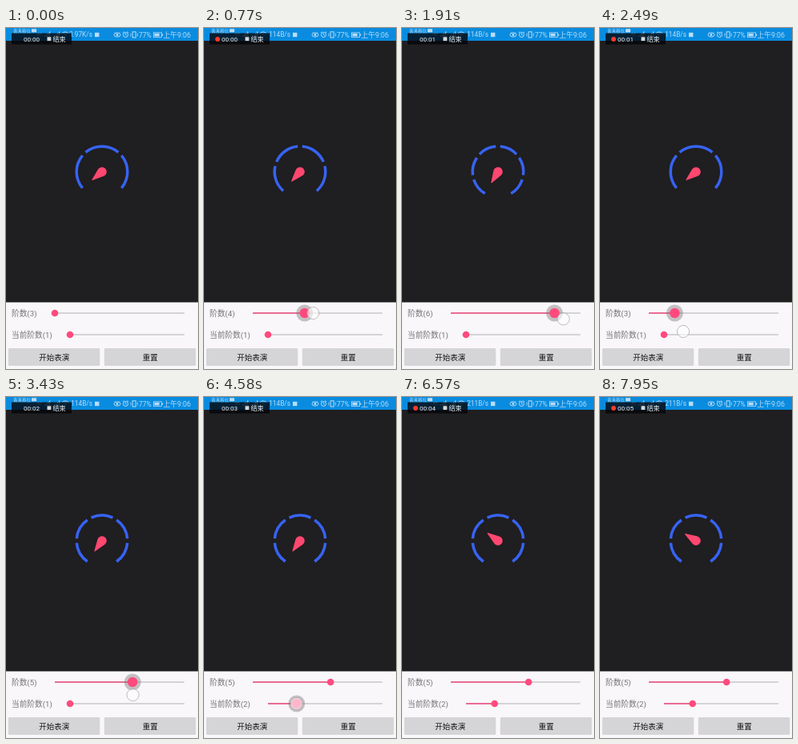
Write an HTML page with a canvas that moves like this. It is 240 px wide and 427 px high and loops after 7.99 s.

```html
<!DOCTYPE html>
<html lang="zh">
<head>
<meta charset="utf-8">
<style>
html, body { margin: 0; width: 100%; height: 100%; overflow: hidden; background: #1f1e20; }
canvas { display: block; width: 100vw; height: 100vh; }
</style>
</head>
<body>
<canvas id="stage"></canvas>
<script>
const W = 240, H = 427, LOOP = 7990;
const PINK = '#ff4a7d', BLUE = '#3763f2', PALE = '#b9dcf6';
const SANS = 'Roboto, "Noto Sans CJK SC", "Noto Sans CJK", sans-serif';
const canvas = document.getElementById('stage');
const ctx = canvas.getContext('2d');
const rad = d => d * Math.PI / 180;
const clamp = v => Math.max(0, Math.min(1, v));
const ease = p => p * p * (3 - 2 * p);

// Finger paths: [ms, x, y]
const dragOne = [[360, 61, 357], [1160, 208, 357], [1310, 215, 357], [1560, 217, 358], [1950, 200, 365],
  [2490, 104, 380], [2680, 101, 377], [2900, 106, 375], [3300, 156, 373], [3450, 159, 373]];
const dragTwo = [[3900, 80, 384], [4120, 84, 384], [4450, 115, 384], [4650, 116, 384]];
const tap = [[5200, 62, 412], [5420, 62, 412]];

function along(path, t) {
  const last = path.length - 1;
  if (t >= path[last][0]) return path[last];
  let i = 0;
  while (i < last - 1 && t >= path[i + 1][0]) i++;
  const a = path[i], b = path[i + 1];
  const p = clamp((t - a[0]) / (b[0] - a[0]));
  return a.map((v, k) => v + (b[k] - v) * p);
}
const held = (path, t) => t >= path[0][0] && t < path[path.length - 1][0];

function rect(x, y, w, h, color) {
  ctx.fillStyle = color;
  ctx.fillRect(x, y, w, h);
}

function disc(x, y, r, color) {
  ctx.fillStyle = color;
  ctx.beginPath();
  ctx.arc(x, y, r, 0, 7);
  ctx.fill();
}

function line(color, width, ...pts) {
  ctx.strokeStyle = color;
  ctx.lineWidth = width;
  ctx.beginPath();
  pts.forEach(([x, y]) => ctx.lineTo(x, y));
  ctx.stroke();
}

function text(str, x, y, size, color, align = 'left', weight = 400) {
  ctx.font = `${weight} ${size}px ${SANS}`;
  ctx.textAlign = align;
  ctx.fillStyle = color;
  ctx.fillText(str, x, y);
}

function statusIcons() {
  for (let i = 0; i < 4; i++) {
    rect(48 + i * 2, 9 - i * 1.5, 1.3, 2 + i * 1.5, PALE);
    rect(60 + i * 2, 9 - i * 1.5, 1.3, 2 + i * 1.5, PALE);
  }
  text('4G', 38, 10, 6, PALE);
  ctx.strokeStyle = PALE;
  ctx.lineWidth = 1;
  for (const r of [3, 6]) {
    ctx.beginPath();
    ctx.arc(74, 11, r, rad(225), rad(315));
    ctx.stroke();
  }
  // eye
  ctx.beginPath();
  ctx.ellipse(139, 8.5, 4, 2.6, 0, 0, 7);
  ctx.stroke();
  disc(139, 8.5, 1.4, PALE);
  line(PALE, 0.8, [136, 5.5], [137, 6.5]);
  line(PALE, 0.8, [142, 5.5], [141, 6.5]);
  // alarm
  ctx.lineWidth = 1;
  ctx.beginPath();
  ctx.arc(149.5, 8.5, 3, 0, 7);
  ctx.stroke();
  line(PALE, 0.8, [149.5, 6.5], [149.5, 8.7], [151, 9.3]);
  line(PALE, 1, [146, 6], [147.5, 4.6]);
  line(PALE, 1, [153, 6], [151.5, 4.6]);
  // vibrate
  ctx.strokeRect(158.2, 4.8, 4, 7.2);
  line(PALE, 0.8, [156, 6.5], [156, 10.5]);
  line(PALE, 0.8, [164.4, 6.5], [164.4, 10.5]);
  // battery
  ctx.lineWidth = 0.8;
  ctx.strokeRect(184.5, 5.8, 10, 5.6);
  rect(185.5, 6.8, 6.2, 3.6, PALE);
  rect(195, 7.5, 1.2, 2.2, PALE);
}

function statusBar(t) {
  rect(0, 0, W, 16, '#098ce0');
  text('青禾移信', 9, 5.5, 5.5, PALE);
  rect(32, 1.2, 6, 4.2, PALE);
  statusIcons();
  const speed = t < 130 ? '3.97K/s' : t < 5500 ? '114B/s' : '211B/s';
  text(speed, 108, 11.3, 8.3, PALE, 'right');
  rect(111, 5.8, 5.4, 5.4, PALE);
  text('77%', 166, 11.5, 8.5, PALE);
  text('上午9:06', 231, 11.5, 8.8, PALE, 'right');
}

function recorder(t) {
  rect(7, 6.5, 75, 14, 'rgba(4,6,10,0.8)');
  const ticks = t + 110;
  if (ticks % 1400 >= 760) disc(17, 14, 2.9, '#fb3b2c');
  text('00:0' + Math.floor(ticks / 1400), 22, 17, 8.1, '#f4f4f4');
  rect(51.5, 11.3, 4.8, 4.8, '#d8d8d8');
  text('结束', 58.5, 17, 8.1, '#eeeeee');
}

function gauge(n, angle) {
  const step = 360 / (n + 1);
  ctx.strokeStyle = BLUE;
  ctx.lineWidth = 3.5;
  for (let i = 0; i < n; i++) {
    const from = 95 + step * (i + 0.5);
    ctx.beginPath();
    ctx.arc(120, 180, 31.8, rad(from), rad(from + step - 10));
    ctx.stroke();
  }
  ctx.save();
  ctx.translate(120, 180);
  ctx.rotate(rad(angle));
  ctx.fillStyle = '#ff4770';
  ctx.beginPath();
  ctx.arc(0, 0, 5.8, rad(70), rad(290));
  ctx.lineTo(16.3, -0.4);
  ctx.lineTo(16.3, 0.4);
  ctx.fill();
  ctx.restore();
}

function slider(x0, y, p, path, t) {
  const x = x0 + (223 - x0) * p;
  const since = t - path[path.length - 1][0];
  const start = t - path[0][0];
  const press = start < 0 ? 0 : since < 0 ? clamp(start / 120) : 1 - clamp(since / 260);
  const halo = since < 0 ? press : 1 - clamp(since / 110);
  line('#c9c7ca', 1.3, [x0, y], [223, y]);
  if (p > 0) line('#ef4a7c', 1.4, [x0, y], [x, y]);
  if (halo) disc(x, y, 10.5, `rgba(125,115,120,${0.42 * halo})`);
  disc(x, y, 4.3 + 1.9 * press, PINK);
}

function button(x, label, pressed) {
  ctx.fillStyle = pressed ? '#bdbcbe' : '#d5d4d6';
  ctx.beginPath();
  ctx.roundRect(x, 401, 114.5, 22, 1.5);
  ctx.fill();
  text(label, x + 57.5, 415.6, 9.5, '#161616', 'center', 500);
}

function touch(path, t) {
  if (!held(path, t)) return;
  const [, x, y] = along(path, t);
  disc(x, y, 7.6, 'rgba(255,255,255,0.6)');
  ctx.strokeStyle = 'rgba(150,146,150,0.65)';
  ctx.lineWidth = 0.9;
  ctx.stroke();
}

function draw(t) {
  const k = t < 360 ? 0 : Math.round((along(dragOne, t)[1] - 61) / 162 * 5);
  const n = Math.max(3, 2 + k);
  const j = t < 3900 ? 0 : Math.round((along(dragTwo, t)[1] - 80) / 143 * 4);
  const rest = 95 + 180 / (n + 1);
  const swing = ease(clamp((t - 5450) / 900));
  const goal = 214 + 2 * Math.cos((t - 6570) / 920 * 2 * Math.PI);

  rect(0, 0, W, H, '#1f1e20');
  statusBar(t);
  recorder(t);
  gauge(n, rest + (goal - rest) * swing);

  rect(0, 343.5, W, 83.5, '#f9f7f9');
  text(`阶数(${n})`, 7, 360.8, 9.7, '#777577');
  text(`当前阶数(${1 + j})`, 7, 387.6, 9.7, '#777577');
  slider(61, 357, k / 5, dragOne, t);
  slider(80, 384, j / 4, dragTwo, t);
  button(2.8, '开始表演', held(tap, t));
  button(122.8, '重置', false);
  [dragOne, dragTwo, tap].forEach(path => touch(path, t));
}

let origin;
function frame(now) {
  origin ??= now;
  const dpr = window.devicePixelRatio || 1;
  const w = Math.round(innerWidth * dpr), h = Math.round(innerHeight * dpr);
  if (canvas.width !== w || canvas.height !== h) {
    canvas.width = w;
    canvas.height = h;
  }
  ctx.setTransform(w / W, 0, 0, h / H, 0, 0);
  draw((now - origin) % LOOP);
  requestAnimationFrame(frame);
}
requestAnimationFrame(frame);
</script>
</body>
</html>
```
